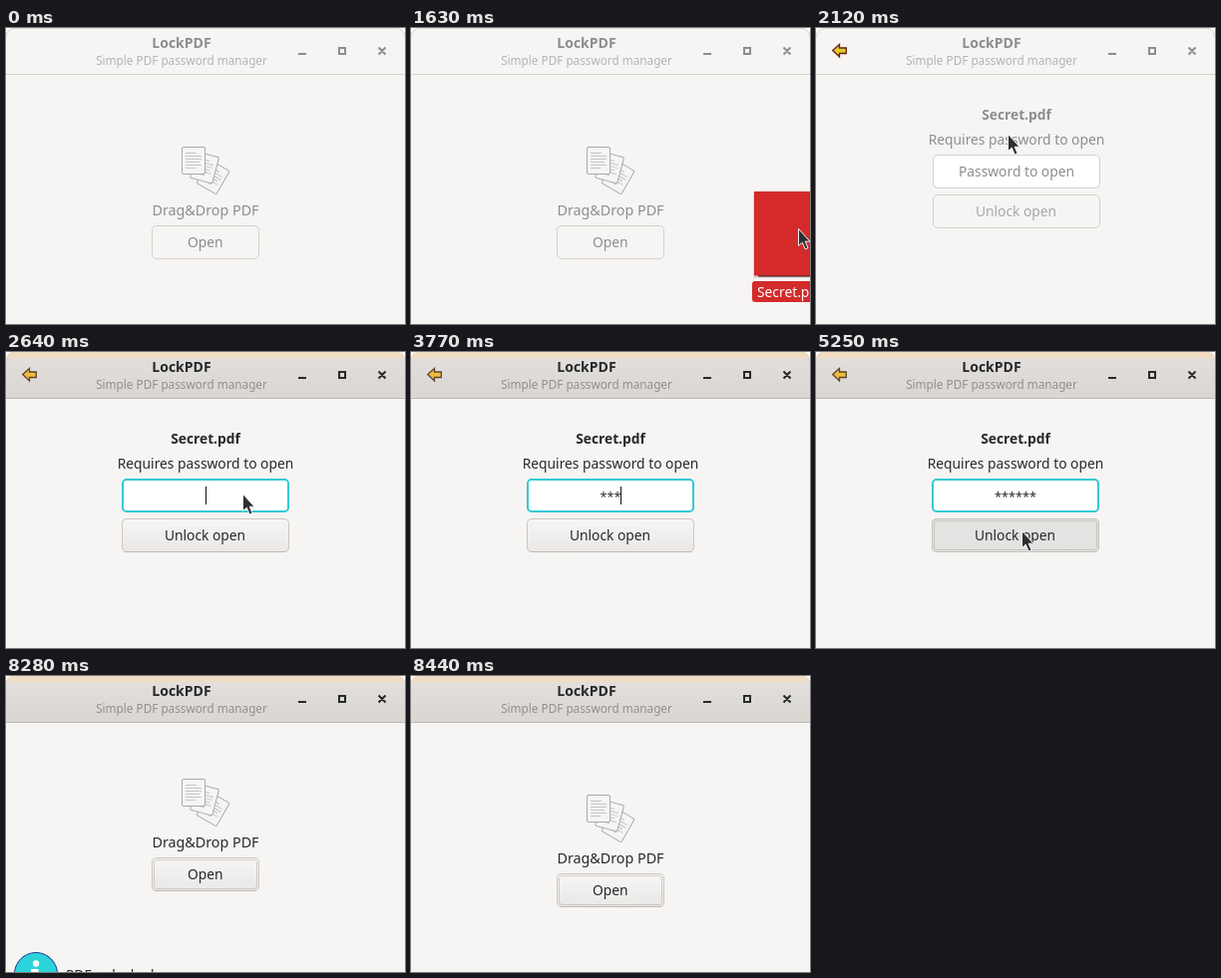
Animation of 400 by 297 pixels, one loop 9.76 s. Source, as an HTML page:

```html
<!DOCTYPE html>
<html lang="en">
<head>
<meta charset="utf-8">
<title>LockPDF</title>
<style>
  html, body { margin: 0; width: 100%; height: 100%; overflow: hidden; background: #fff; }
  svg { display: block; width: 100%; height: 100%; }
  text { font: 13.8px "Noto Sans", "Open Sans", sans-serif; fill: var(--text); text-anchor: middle; }
  .bold { font-weight: 700; }
  .sub { font-size: 11.75px; fill: var(--dim); }
  .drop { font-size: 14.3px; }
  .hint { fill: #8b8e8f; }
  .stars { font-size: 12.7px; }
  .left { text-anchor: start; }
  .box { fill: #f6f5f4; stroke: #d5d0cc; }
  .lit { opacity: var(--f); }
  .raised { fill: url(#raise); stroke: #cdc7c2; }
  .ring { fill: none; stroke: #aaa6a2; stroke-dasharray: 1 1; }
  .sheet { fill: #f6f5f4; stroke: #a8aaaa; }
  .rows { fill: none; stroke: #c3c4c4; }
  .tool { fill: none; stroke: var(--text); stroke-width: 2; }
</style>
</head>
<body>
<svg viewBox="0 0 400 297">
  <defs>
    <linearGradient id="bar" x1="0" y1="0" x2="0" y2="1">
      <stop offset="0" stop-color="#f1dcc0"/>
      <stop offset=".1" stop-color="#eedcc4"/>
      <stop offset=".17" stop-color="#e1dedb"/>
      <stop offset="1" stop-color="#dad6d2"/>
    </linearGradient>
    <linearGradient id="raise" x1="0" y1="0" x2="0" y2="1">
      <stop offset="0" stop-color="#f7f6f5"/>
      <stop offset="1" stop-color="#eae8e6"/>
    </linearGradient>
    <linearGradient id="blue" x1="0" y1="0" x2="0" y2="1">
      <stop offset=".5" stop-color="#2020b8"/>
      <stop offset="1" stop-color="#2c2ce6"/>
    </linearGradient>
    <g id="page">
      <rect class="sheet" x="-11.5" y="-13.5" width="23" height="27" rx="1.5"/>
      <path class="rows" d="M-8 -7.5h11M-8 -4.5h16M-8 -1.5h16M-8 1.5h14M-8 4.5h16M-8 7.5h10"/>
    </g>
    <path id="win" d="M0 297V8Q0 0 8 0H392Q400 0 400 8V297Z"/>
  </defs>

  <use href="#win" fill="#f6f5f4"/>
  <path d="M.5 9Q.5 .5 9 .5H391Q399.5 .5 399.5 9" fill="none" stroke="#dcd9d6"/>

  <g id="first">
    <g id="content">
      <use href="#page" transform="translate(207.5 149.5) rotate(30)"/>
      <use href="#page" transform="translate(199 140) rotate(15)"/>
      <use href="#page" transform="translate(188 133)"/>
      <text class="drop" x="200" y="188">Drag&amp;Drop PDF</text>
      <rect class="box" x="146.5" y="198.5" width="107" height="33" rx="4.5"/>
      <g class="lit">
        <rect class="raised" x="146.5" y="198.5" width="107" height="33" rx="4.5"/>
        <path d="M149 231.5H251" stroke="#bfb8b1"/>
        <rect class="ring" x="148.5" y="200.5" width="103" height="29" rx="3"/>
      </g>
      <text x="199.7" y="220">Open</text>
    </g>
  </g>

  <g id="second">
    <text class="bold" x="200" y="92">Secret.pdf</text>
    <text x="200" y="117">Requires password to open</text>
    <rect x="116.5" y="127.5" width="167" height="33" rx="4.5" fill="#fff" stroke="#d5d0cc"/>
    <rect class="lit" x="117" y="128" width="166" height="32" rx="4" fill="#fff" stroke="#35cad4" stroke-width="2"/>
    <text id="hint" class="hint" x="200" y="149">Password to open</text>
    <text id="stars" class="stars" x="200" y="150"></text>
    <rect id="caret" y="135" width="1" height="18" fill="#111"/>
    <rect class="box" x="116.5" y="167.5" width="167" height="33" rx="4.5"/>
    <g class="lit">
      <rect class="raised" x="116.5" y="167.5" width="167" height="33" rx="4.5"/>
      <path d="M119 200.5H281" stroke="#bfb8b1"/>
    </g>
    <g id="pressed">
      <rect x="116.5" y="167.5" width="167" height="33" rx="4.5" fill="#e3e3e1" stroke="#c6c0bb"/>
      <rect class="ring" x="118.5" y="169.5" width="163" height="29" rx="3"/>
    </g>
    <text x="199.5" y="189" style="fill:var(--unlock)">Unlock open</text>
  </g>

  <g id="info">
    <circle cx="30" cy="272" r="21.5" fill="url(#blue)" stroke="#2a3a8c"/>
    <path d="M9 273A21 21 0 0 1 51 271Q40 268 30 273T9 273Z" fill="#2bd3da"/>
    <circle cx="30" cy="261.5" r="3.2" fill="#fff"/>
    <path d="M25 267H32.5V282H36V285H24.5V282H28V270H25Z" fill="#fff"/>
    <text class="left" x="60" y="278">PDF unlocked.</text>
  </g>

  <path d="M0 46.5H400" stroke="#d5d0cc"/>
  <g class="lit">
    <path d="M0 46V8Q0 0 8 0H392Q400 0 400 8V46Z" fill="url(#bar)"/>
    <path d="M0 46.5H400" stroke="#bfb8b1"/>
  </g>
  <path id="back" d="M16.7 22.5L23.5 16.5V20H30.3V25.5H23.5V29Z" style="fill:var(--arrow);stroke:var(--edge)" stroke-width="1.3"/>
  <text class="bold" x="176" y="20" style="font-size:14px">LockPDF</text>
  <text class="sub" x="176" y="37">Simple PDF password manager</text>
  <path class="tool" d="M293 26H301M334 20H340V26H334ZM373.5 19.5L380.5 26.5M380.5 19.5L373.5 26.5"/>

  <g id="cursor">
    <g id="file">
      <rect x="-45" y="-36" width="77" height="86" fill="#000" opacity=".12"/>
      <path d="M-40 47.5H30" stroke="#3a1212" stroke-width="2"/>
      <rect x="-44" y="-37" width="74" height="84.5" fill="#d42a2a"/>
      <rect x="-46" y="53" width="79" height="21" rx="3" fill="#d42a2a"/>
      <text class="left" x="-41" y="69" style="fill:#fff">Secret.pdf</text>
    </g>
    <path d="M.5 .5V17.5L4.3 14.2L7.2 21L10 19.7L7.2 13.2H12Z" fill="#2c3033" stroke="#f4f4f4"/>
  </g>
</svg>
<script>
const LOOP = 9760, STEP = 40;
const DROP = 1948, CLICK = 2480, PRESS = 5250, UNLOCK = 5370, HIDE = 8240;
const KEYS = [3490, 3620, 3770, 3960, 4090, 4250];
const GRID = [0, 1630, 2000, 4930, 8280];
// time, x, y; the pointer is away between the runs
const RUNS = [
  [[1630, 388, 201], [1930, 192, 106], [2320, 192, 106], [2480, 194, 140],
   [2560, 194, 140], [2840, 412, 150]],
  [[4930, 392, 202], [5210, 206, 179], [5420, 206, 179], [5730, 412, 200]]
];
const COLORS = {
  text: ["#8b8e8f", "#26292b"],
  dim: ["#b3b4b2", "#8f908f"],
  unlock: ["#a6a8a8", "#26292b"],
  arrow: ["#e0cb2c", "#f0bd3c"],
  edge: ["#6a1c1c", "#5c4430"]
};

const $ = id => document.getElementById(id);
const clamp = v => Math.min(1, Math.max(0, v));
const easeOut = p => 1 - (1 - p) ** 3;
const ramp = (t, start, len) => easeOut(clamp((t - start) / len));
const show = (id, on) => $(id).style.display = on ? "" : "none";
const move = (id, x, y) => $(id).setAttribute("transform", `translate(${Math.round(x)} ${Math.round(y)})`);

function mix([a, b], f) {
  const part = (c, i) => parseInt(c.slice(i, i + 2), 16);
  return `rgb(${[1, 3, 5].map(i => Math.round(part(a, i) + (part(b, i) - part(a, i)) * f))})`;
}

function pointer(t) {
  const run = RUNS.find(r => t >= r[0][0] && t < r[r.length - 1][0]);
  if (!run) return null;
  const i = run.findIndex(k => t < k[0]);
  const [t0, x0, y0] = run[i - 1], [t1, x1, y1] = run[i];
  const p = (t - t0) / (t1 - t0), e = p * p * (3 - 2 * p);
  return [x0 + (x1 - x0) * e, y0 + (y1 - y0) * e];
}

function caretOn(t) {
  if (t < CLICK || t >= PRESS) return false;
  const since = Math.max(2500, ...KEYS.filter(k => k <= t));
  return (t - since) % 1200 < 800;
}

function draw(now) {
  const base = GRID.filter(g => g <= now).pop();
  const t = base + Math.floor((now - base) / STEP) * STEP;

  const focus = ramp(t, CLICK - STEP, 200);
  const root = document.documentElement.style;
  root.setProperty("--f", focus);
  for (const name in COLORS) root.setProperty("--" + name, mix(COLORS[name], focus));

  const slide = ramp(t, DROP, 200) - ramp(t, UNLOCK, 200);
  move("first", -400 * slide, 0);
  move("second", 400 * (1 - slide), 0);
  show("first", slide < 1);
  show("second", slide > 0);
  show("back", t >= DROP && t < UNLOCK);

  const bar = ramp(t, UNLOCK, 250) - ramp(t, HIDE, 220);
  move("content", 0, -30 * bar);
  move("info", 0, 60 * (1 - bar));
  show("info", bar > 0.02);

  const typed = KEYS.filter(k => k <= now).length;
  $("stars").textContent = "*".repeat(typed);
  $("caret").setAttribute("x", Math.floor(200 + 3.5 * typed));
  show("caret", caretOn(now));
  show("hint", t < CLICK);
  show("pressed", t >= PRESS);

  const at = pointer(t);
  show("cursor", at);
  show("file", t < DROP);
  if (at) move("cursor", ...at);
}

const t0 = performance.now();
function tick() {
  draw((performance.now() - t0) % LOOP);
  requestAnimationFrame(tick);
}
tick();
</script>
</body>
</html>
```
